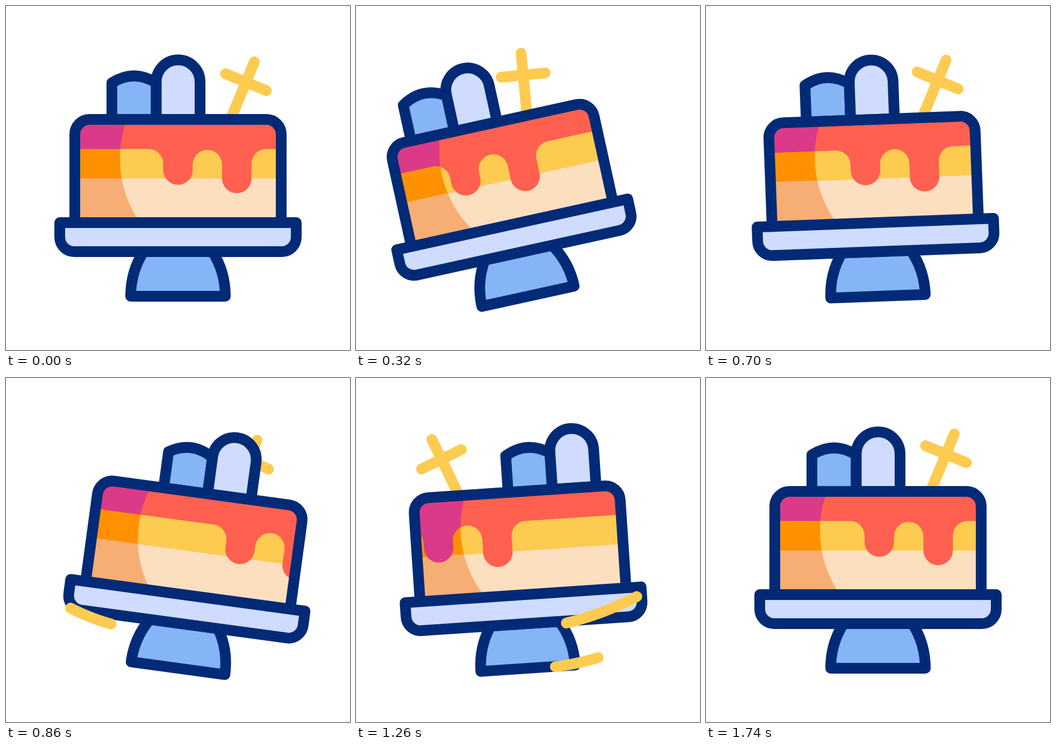
These frames come from a looping animation (640 by 640 pixels, 2.4 s). An HTML page with a canvas:

```html
<!DOCTYPE html>
<html lang="en">
<head>
<meta charset="utf-8">
<title>Spinning cake</title>
<style>
  html, body { margin: 0; width: 100%; height: 100%; overflow: hidden; background: #fff; }
  canvas { display: block; width: 100vmin; height: 100vmin; }
</style>
</head>
<body>
<canvas id="stage" width="640" height="640"></canvas>
<script>
const ctx = document.getElementById('stage').getContext('2d');
const LOOP = 2400, END = 1740, STEP = 20;
const NAVY = '#032a76', BLUE = '#85b4f7', PALE = '#cfdcff', GOLD = '#fdcb50';
const LIGHT = { cream: '#fcdfbf', filling: GOLD, icing: '#ff604f' };
const SHADE = { cream: '#f7ae74', filling: '#ff9100', icing: '#db3a88' };
const ICING_PERIOD = 537;

// Keyframes as [time, value] pairs
const tilt = [[0, 0], [467, -16.2], [887, 8], [1233, -4], [1500, 2], [END, 0]];
const icingX = [[0, 0], [452, -84], [1646, 539.5]];
const waferX = [[0, 0], [470, -36], [1175, 115], [END, 0]];
const crossX = [[0, 0], [470, -34], [720, -2.7], [1225, -203], [END, 0]];
const crossTilt = [[0, 22.5], [470, 2], [720, 25], [1225, -22.6], [END, 22.5]];

const smooth = s => s * s * (3 - 2 * s);
const rad = deg => deg * Math.PI / 180;

function at(keys, t) {
  for (let i = 1; i < keys.length; i++) {
    const [t0, a] = keys[i - 1], [t1, b] = keys[i];
    if (t <= t1) return a + (b - a) * smooth((t - t0) / (t1 - t0));
  }
  return keys[keys.length - 1][1];
}

function shape(path, fill, stroke) {
  const p = new Path2D(path);
  if (fill) { ctx.fillStyle = fill; ctx.fill(p); }
  if (stroke) { ctx.strokeStyle = stroke; ctx.stroke(p); }
}

function wafers(x) {
  ctx.save();
  ctx.translate(x, 0);
  shape('M197 211V143Q238 117 279.5 143V211Z', BLUE, NAVY);
  shape('M279.5 211V141a40.75 40.75 0 0 1 81.5 0V211Z', PALE, NAVY);
  ctx.restore();
}

function cross(x, deg) {
  ctx.save();
  ctx.translate(415.7 + x, 215.8);
  ctx.rotate(rad(deg));
  shape('M0 0V-121M-41.2 -80.2H41.2', null, GOLD);
  ctx.restore();
}

const ICING = new Path2D(
  'M0 200H800V266H484.2a27.4 27.4 0 0 0 -27.4 27.4V321' +
  'a27.4 27.4 0 0 1 -54.8 0V293.4a27.4 27.4 0 0 0 -54.7 0V307' +
  'a27.4 27.4 0 0 1 -54.7 0V293.4A27.4 27.4 0 0 0 265.2 266H0Z');

function layers(colors, x) {
  const band = (color, y, h) => { ctx.fillStyle = color; ctx.fillRect(120, y, 400, h); };
  band(colors.cream, 321, 82);
  band(colors.filling, 211, 110);
  band(colors.icing, 211, 55);
  for (const dx of [x, x - ICING_PERIOD]) {
    ctx.save();
    ctx.translate(dx, 0);
    ctx.fill(ICING);
    ctx.restore();
  }
}

const BODY = 'M128 403V238.5a27.5 27.5 0 0 1 27.5 -27.5H484.5a27.5 27.5 0 0 1 27.5 27.5V403';

function cake(x) {
  ctx.save();
  ctx.clip(new Path2D(BODY + 'Z'));
  layers(SHADE, x);
  ctx.beginPath();
  ctx.arc(417, 284.5, 205, 0, 2 * Math.PI);
  ctx.clip();
  layers(LIGHT, x);
  ctx.restore();
  shape(BODY, null, NAVY);
}

function stand() {
  shape('M256 457C241 480 232 509 232 540H408C408 509 399 480 384 457Z', BLUE, NAVY);
  shape('M100 403H540V430a27 27 0 0 1 -27 27H127a27 27 0 0 1 -27 -27Z', PALE, NAVY);
}

// Strokes the part of a curve between a trailing and a leading end
function streak(t, start, span, delay, point) {
  const ease = s => smooth(Math.min(1, Math.max(0, s)));
  const head = ease((t - start) / span);
  const tail = ease((t - start - delay) / span);
  if (head - tail < 0.001) return;
  ctx.beginPath();
  for (let i = 0; i <= 40; i++) ctx.lineTo(...point(tail + (head - tail) * i / 40));
  ctx.strokeStyle = GOLD;
  ctx.stroke();
}

function upperCurve(p) {
  const x = 120 + 405 * p, d = x - 280;
  return [x, 469 - (d < 0 ? 0.0016 : 0.00106) * d * d];
}

function lowerCurve(p) {
  const q = 1 - p;
  const quad = (a, b, c) => q * q * a + 2 * q * p * b + p * p * c;
  return [quad(342, 412, 472), quad(540, 535, 513)];
}

function draw(t) {
  ctx.fillStyle = '#fff';
  ctx.fillRect(0, 0, 640, 640);
  ctx.lineWidth = 20;
  ctx.lineCap = ctx.lineJoin = 'round';

  ctx.save();
  ctx.translate(320, 540);
  ctx.rotate(rad(at(tilt, t)));
  ctx.translate(-320, -540);
  const front = t > 1225;
  if (front) wafers(at(waferX, t));
  cross(at(crossX, t), at(crossTilt, t));
  if (!front) wafers(at(waferX, t));
  cake(at(icingX, t));
  stand();
  ctx.restore();

  streak(t, 697, 590, 200, upperCurve);
  streak(t, 974, 391, 171, lowerCurve);
}

const origin = performance.now();
function tick() {
  const t = (performance.now() - origin) % LOOP;
  draw(Math.min(END, Math.floor(t / STEP) * STEP));
  requestAnimationFrame(tick);
}
tick();
</script>
</body>
</html>
```
